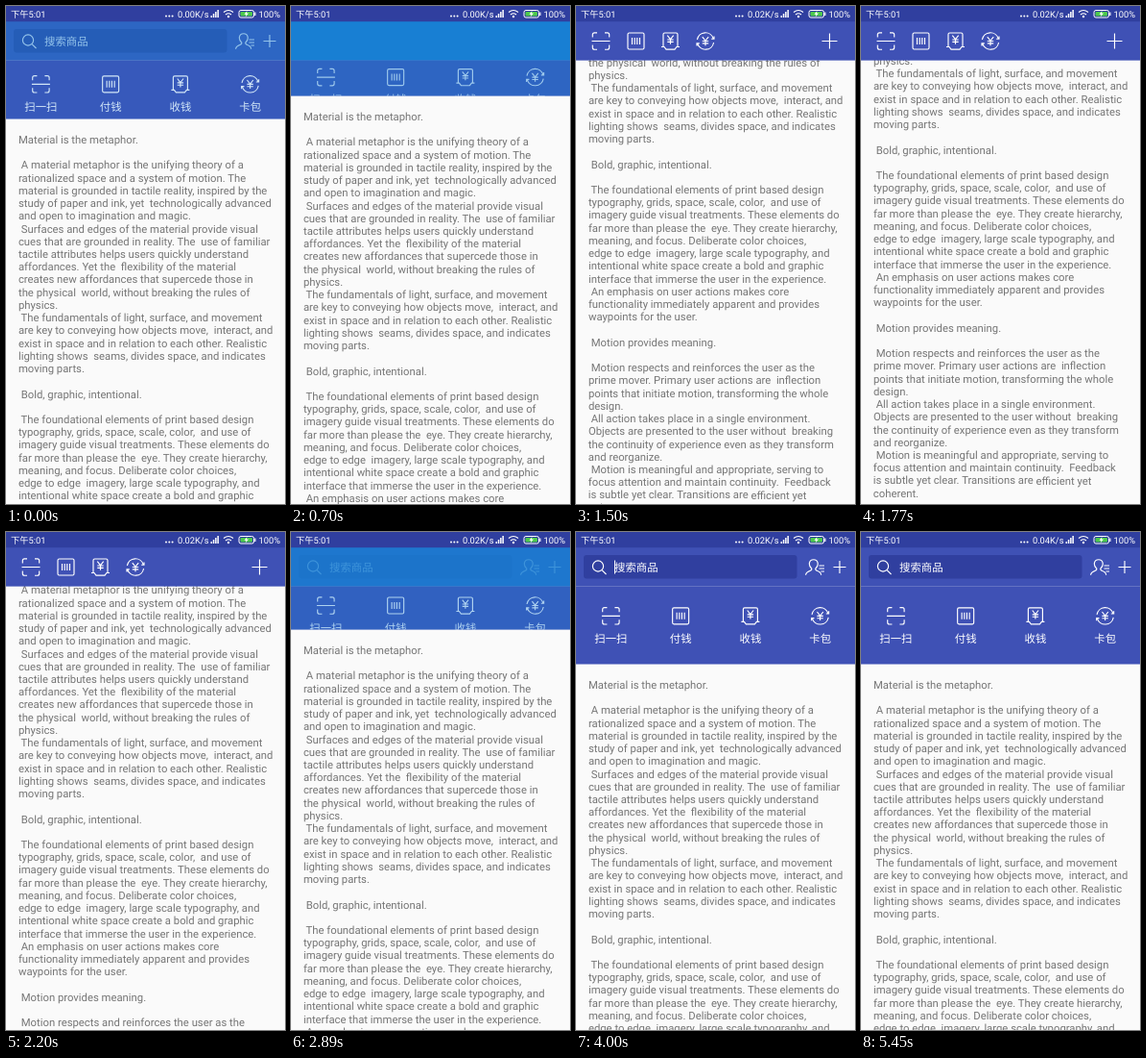
These frames come from a looping animation (291x518 px, 5.55 s). An HTML page:

```html
<!DOCTYPE html>
<html lang="zh-CN">
<head>
<meta charset="utf-8">
<title>Collapsing toolbar</title>
<style>
  html, body { margin: 0; width: 100%; height: 100%; overflow: hidden; background: #fafafa; }
  svg { display: block; width: 291px; height: 518px; }
  text {
    font-family: Roboto, "Noto Sans CJK SC", "Noto Sans CJK", sans-serif;
    white-space: pre; text-rendering: geometricPrecision;
  }
  .body text { font-size: 11.3px; fill: #757575; }
  .ui text { font-size: 11.4px; fill: #fff; }
  .status text { font-size: 9.3px; fill: #fff; }
  .line { fill: none; stroke: #fff; stroke-width: 1.15; }
</style>
</head>
<body>
<svg viewBox="0 0 291 518">
  <defs>
    <g id="scan" class="line">
      <path d="M-8.7-4v-2.700q0-2 2-2h2.700M4-8.700h2.700q2 0 2 2V-4M8.700 4v2.700q0 2-2 2H4M-4 8.700h-2.700q-2 0-2-2V4M-9.500 0h19"/>
    </g>
    <g id="pay" class="line">
      <rect x="-8.5" y="-8.5" width="17" height="17" rx="1.5"/>
      <path d="M-4-3.500v7M-1.300-3.500v7M1.300-3.500v7M4-3.500v7"/>
    </g>
    <path id="yen" class="line" d="M-3.200-4.300L0-.3 3.200-4.300M0-.3v5M-3.200 0h6.400M-3.200 2.400h6.400"/>
    <g id="collect" class="line">
      <path d="M-7.500 6v-13q0-1.500 1.500-1.500h12q1.500 0 1.500 1.500v13M-9.500 6h3l2 2.600h9l2-2.600h3"/>
      <use href="#yen" y="-1.5"/>
    </g>
    <g id="card" class="line">
      <path d="M-8.600-1.500A8.700 8.700 0 0 1 8.300-2.500M8.600 1.500A8.700 8.700 0 0 1-8.300 2.500M9-5v2.700h-2.800M-9 5v-2.700h2.800"/>
      <use href="#yen"/>
    </g>
    <clipPath id="payClip"><rect id="payClipBox" y="56.6" width="291" height="80.8"/></clipPath>
  </defs>

  <rect width="291" height="518" fill="#fafafa"/>
  <g id="article" class="body"></g>

  <g class="ui">
    <g clip-path="url(#payClip)">
      <rect y="56" width="291" height="82" fill="#3f51b5"/>
      <g id="payBar" text-anchor="middle"></g>
      <rect id="payMask" y="56" width="291" height="82" fill="#187fd3"/>
    </g>
    <rect y="16" width="291" height="40.6" fill="#3f51b5"/>
    <g id="expanded">
      <rect x="8" y="24" width="222.5" height="24.5" rx="3" fill="#303f9f"/>
      <g class="line">
        <circle cx="23" cy="35.5" r="5.6"/>
        <path d="M27 39.6l4.5 4.4"/>
        <path d="M245.500 37.700c-3.200-2.700-3-9 2.300-9s5.500 6.300 2.300 9c-.8 1 0 2 1.200 2.500 2.500 1 4.400 2 4.400 4.500M245.500 37.700c.8 1 0 2-1.200 2.500-2.500 1-4.700 2-4.700 4.500M253.500 35h5.500M253.500 38h5.500M255.500 41h3.500"/>
        <path d="M268.500 36.500h13M275 30v13"/>
      </g>
      <text x="40" y="40.8">搜索商品</text>
      <rect id="cursor" x="40" y="29.5" width="1" height="14" fill="#fff"/>
    </g>
    <g id="collapsed">
      <use href="#scan" x="26" y="36.5"/>
      <use href="#pay" x="62.5" y="36.5"/>
      <use href="#collect" x="98.5" y="36.5"/>
      <use href="#card" x="135" y="36.5"/>
      <path class="line" d="M256.500 36.500h16M264.500 28.500v16"/>
    </g>
    <rect id="toolMask" y="16" width="291" height="40.6" fill="#187fd3"/>
  </g>

  <g class="status">
    <rect width="291" height="16.2" fill="#303f9f"/>
    <text x="5" y="11.5">下午5:01</text>
    <g fill="#fff">
      <circle cx="167" cy="10.5" r="1"/><circle cx="170.3" cy="10.5" r="1"/><circle cx="173.6" cy="10.5" r="1"/>
      <path d="M213.500 12v-2h1.500v2zM215.800 12v-4h1.500v4zM218.100 12v-6h1.500v6zM220.400 12v-8h1.500v8z"/>
      <circle cx="232" cy="11" r="1.2"/>
    </g>
    <path class="line" d="M227 6.500q5-4 10 0M229 9q3-2.500 6 0"/>
    <rect x="243" y="4.5" width="15.5" height="7.5" rx="2" fill="none" stroke="#fff"/>
    <rect x="244.5" y="6" width="12.5" height="4.5" rx="1" fill="#4cc94c"/>
    <path d="M259.300 6.500h1.200v3.500h-1.200zM251.500 5l-3 3.700h2l-.8 2.800 3.300-3.900h-2.100z" fill="#fff"/>
    <text id="speed" x="211.5" y="11.5" text-anchor="end"></text>
    <text x="263.5" y="11.5">100%</text>
  </g>
</svg>
<script>
const LOOP = 5550, RANGE = 80.8, DEVICE_SCALE = 720 / 291;
const $ = id => document.getElementById(id);

const copy = `Material is the metaphor.

 A material metaphor is the unifying theory of a
rationalized space and a system of motion. The
material is grounded in tactile reality, inspired by the
study of paper and ink, yet  technologically advanced
and open to imagination and magic.
 Surfaces and edges of the material provide visual
cues that are grounded in reality. The  use of familiar
tactile attributes helps users quickly understand
affordances. Yet the  flexibility of the material
creates new affordances that supercede those in
the physical  world, without breaking the rules of
physics.
 The fundamentals of light, surface, and movement
are key to conveying how objects move,  interact, and
exist in space and in relation to each other. Realistic
lighting shows  seams, divides space, and indicates
moving parts.

 Bold, graphic, intentional.

 The foundational elements of print based design
typography, grids, space, scale, color,  and use of
imagery guide visual treatments. These elements do
far more than please the  eye. They create hierarchy,
meaning, and focus. Deliberate color choices,
edge to edge  imagery, large scale typography, and
intentional white space create a bold and graphic
interface that immerse the user in the experience.
 An emphasis on user actions makes core
functionality immediately apparent and provides
waypoints for the user.

 Motion provides meaning.

 Motion respects and reinforces the user as the
prime mover. Primary user actions are  inflection
points that initiate motion, transforming the whole
design.
 All action takes place in a single environment.
Objects are presented to the user without  breaking
the continuity of experience even as they transform
and reorganize.
 Motion is meaningful and appropriate, serving to
focus attention and maintain continuity.  Feedback
is subtle yet clear. Transitions are efficient yet
coherent.`;

$('article').innerHTML = copy.split('\n')
  .map((line, i) => `<text x="13" y="${162.9 + i * 13.23}">${line}</text>`).join('');

$('payBar').innerHTML = [['scan', '扫一扫'], ['pay', '付钱'], ['collect', '收钱'], ['card', '卡包']]
  .map(([icon, label], i) => {
    const x = 36.4 + i * 72.75;
    return `<use href="#${icon}" x="${x}" y="87.3"/><text x="${x}" y="114.6">${label}</text>`;
  }).join('');

// The screen refreshes only at these moments.
const ticks = [0, 160, 310, 460, 580, 700, 850, 1000, 1120, 1240, 1360, 1500, 1620, 1770, 1920, 2040,
  2200, 2350, 2500, 2650, 2770, 2890, 3050, 3170, 3310, 3430, 3590, 3730, 3850, 4000, 4430, 4870, 4990, 5140, 5450];

// [time, scroll distance]
const drag = [[0, 20], [700, 44], [1000, 62], [1120, 85], [1500, 259], [1620, 280], [1770, 274],
  [2200, 125], [2500, 89], [2890, 36], [3310, 17], [3730, 0], [LOOP, 0]];

function scrollAt(t) {
  const i = drag.findIndex(key => key[0] > t);
  const [t0, s0] = drag[i - 1], [t1, s1] = drag[i];
  return s0 + (s1 - s0) * (t - t0) / (t1 - t0);
}

const set = (id, name, value) => $(id).setAttribute(name, value);

function render(time) {
  const t = ticks.filter(tick => tick <= time).pop();
  const scroll = scrollAt(t);
  const offset = Math.min(scroll, RANGE);
  const alpha = offset * DEVICE_SCALE;
  const open = offset <= RANGE / 2;
  const toolAlpha = open ? alpha * 2.4 : Math.max(0, 200 - alpha) * 2.8;

  // The minute rotation keeps baselines from snapping to whole pixels.
  set('article', 'transform', `translate(0 ${-scroll}) rotate(.01)`);
  set('payBar', 'transform', `translate(0 ${-offset * 0.3})`);
  set('payClipBox', 'height', RANGE - offset);
  set('payMask', 'opacity', alpha / 255);
  set('toolMask', 'opacity', Math.min(1, toolAlpha / 255));
  set('expanded', 'visibility', open ? 'visible' : 'hidden');
  set('collapsed', 'visibility', open ? 'hidden' : 'visible');
  set('cursor', 'opacity', (t >= 3430 && t < 4430) || (t >= 4870 && t < 5450) ? 1 : 0);
  $('speed').textContent = (t < 1000 ? '0.00' : t < 4430 ? '0.02' : '0.04') + 'K/s';
}

const start = performance.now();
function frame() {
  render((performance.now() - start) % LOOP);
  requestAnimationFrame(frame);
}
frame();
</script>
</body>
</html>
```
